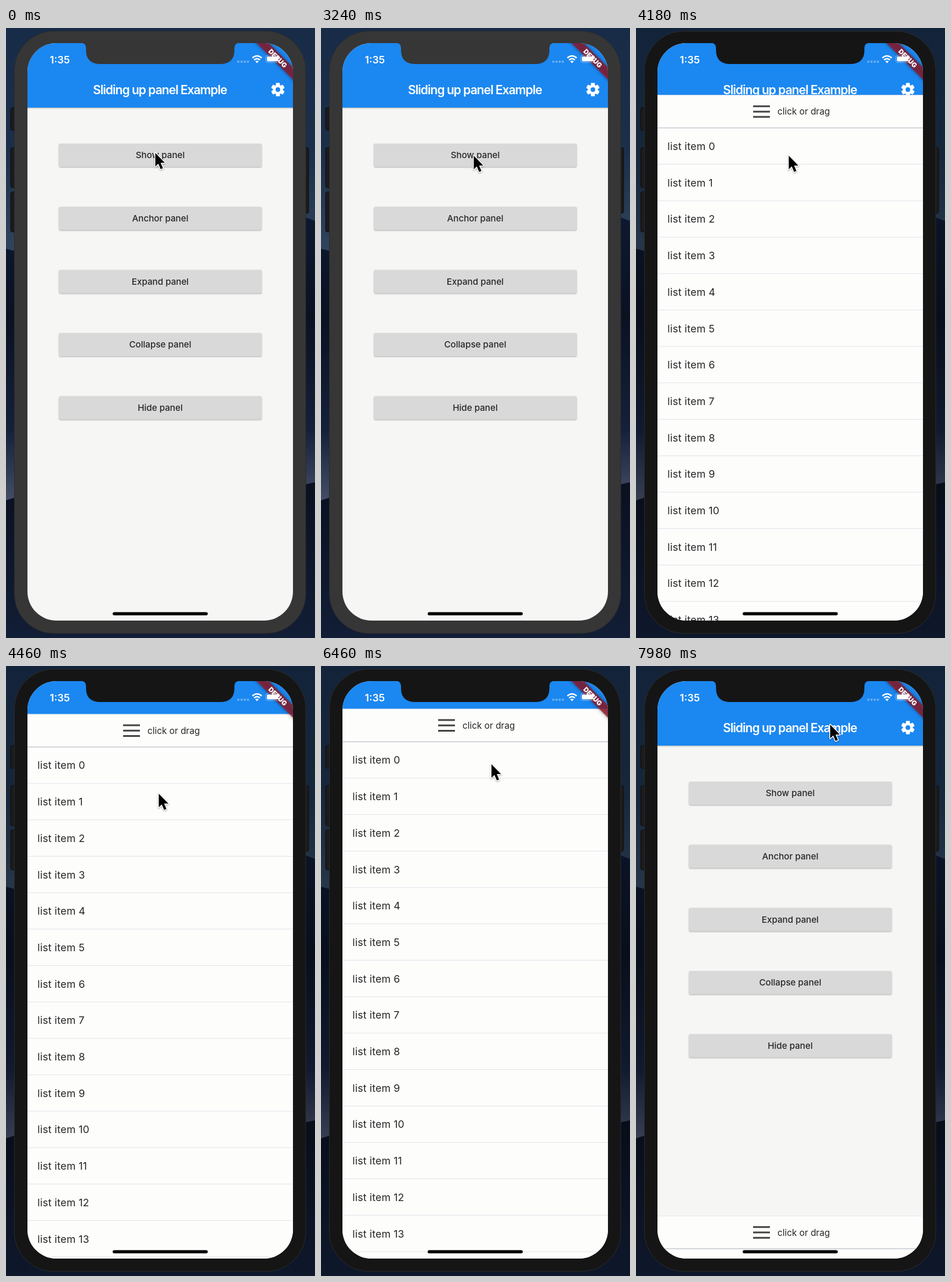
Animation of 533x1050 px, one loop 8000 ms. Source, as an HTML page:

```html
<!DOCTYPE html>
<html lang="en">
<head>
<meta charset="utf-8">
<title>Sliding up panel</title>
<style>
  html, body { margin: 0; width: 100%; height: 100%; overflow: hidden; background: #101b30; }
  svg { display: block; width: 533px; height: 1050px; }
  text { font-family: Inter, Roboto, sans-serif; dominant-baseline: central; fill: #262626; }
  .mid { text-anchor: middle; }
  .label { font-size: 15.2px; font-weight: 500; }
  .item { font-size: 17.7px; letter-spacing: .16px; }
  .white { fill: #fff; font-weight: 600; }
  .raised { filter: drop-shadow(0 1.5px 1.2px rgba(0, 0, 0, .3)); }
</style>
</head>
<body>
<svg viewBox="0 0 533 1050">
  <defs>
    <linearGradient id="sky" x2="0" y2="1">
      <stop offset="0" stop-color="#182c48"/>
      <stop offset=".2" stop-color="#1b2f4a"/>
      <stop offset=".36" stop-color="#30435c"/>
    </linearGradient>
    <linearGradient id="dune" x2="0" y2="1">
      <stop offset="0" stop-color="#0d1930"/>
      <stop offset=".35" stop-color="#0a1222"/>
      <stop offset=".75" stop-color="#15203a"/>
      <stop offset="1" stop-color="#454e67"/>
    </linearGradient>
    <linearGradient id="ground" x2="0" y2="1">
      <stop offset="0" stop-color="#0a1020"/>
      <stop offset="1" stop-color="#121e36"/>
    </linearGradient>
    <clipPath id="screen"><rect x="37" y="26" width="458" height="994" rx="50"/></clipPath>
    <clipPath id="showButton"><rect x="91" y="199" width="350" height="41" rx="2.5"/></clipPath>
  </defs>

  <rect width="533" height="1050" fill="url(#sky)"/>
  <path d="M0 380L16 384L514 325L533 332V815H0Z" fill="url(#dune)"/>
  <path d="M0 813L16 808L514 786L533 782V1050H0Z" fill="url(#ground)"/>
  <rect id="dim" width="533" height="1050" fill="#000" opacity="0"/>

  <g fill="#1b1b1d" stroke="#0c0c0e">
    <rect x="8" y="137" width="14" height="39" rx="3"/>
    <rect x="8" y="206" width="14" height="69" rx="3"/>
    <rect x="8" y="282" width="14" height="69" rx="3"/>
    <rect x="508" y="206" width="14" height="113" rx="3"/>
  </g>
  <rect id="bezel" x="14.5" y="5.5" width="502.5" height="1036.5" rx="68" stroke="#2b2b2b"/>

  <g clip-path="url(#screen)">
    <rect x="37" y="26" width="459" height="994" fill="#f6f6f5"/>
    <g id="buttons"></g>
    <circle id="ripple" cx="264" cy="220" clip-path="url(#showButton)"/>
    <rect class="raised" x="30" y="20" width="473" height="117" fill="#1b87f0"/>
    <text class="mid white" x="265.5" y="106" font-size="21" letter-spacing="-.95">Sliding up panel Example</text>
    <g id="gear" transform="translate(469 106)" fill="#fff"></g>
    <g id="panel"></g>
    <g transform="translate(495 26) rotate(45)">
      <rect x="-80" y="29.5" width="160" height="15" fill="#8c1a2c" fill-opacity=".82"
            style="filter:drop-shadow(0 0 3px rgba(0,0,0,.5))"/>
      <text class="mid white" y="37.3" font-size="11.5" style="font-weight:900">DEBUG</text>
    </g>
  </g>

  <path id="notch" d="M129 25.5Q138 26 138 34V38Q138 62 163 62H369Q394 62 394 38V34Q394 26 403 25.5Z"/>
  <text class="white" x="75.5" y="54" font-size="17.5">1:35</text>
  <g fill="#fff">
    <path d="M399 58H419" stroke="#fff" stroke-opacity=".35" stroke-width="3.5" stroke-dasharray="3.5 2"/>
    <g fill="none" stroke="#fff" stroke-width="2.6">
      <path d="M425 51.5Q433 44.5 441 51.5"/>
      <path d="M428 55Q433 50.5 438 55"/>
    </g>
    <path d="M430 57.5Q433 55 436 57.5L433 60.5Z"/>
    <rect x="448" y="47" width="24" height="12.5" rx="3.5" fill="none" stroke="#fff" stroke-opacity=".4"/>
    <rect x="450" y="49" width="20" height="8.5" rx="2"/>
    <rect x="473.5" y="51" width="1.8" height="4.5" rx="1" opacity=".5"/>
  </g>
  <rect x="184" y="1005.5" width="164" height="5.5" rx="2.75"/>

  <path id="cursor" d="M0 0V23.5L5.2 18.6L9.3 28L13.2 26.3L9.2 17H16.5Z" stroke="#fff" stroke-width="3"
        stroke-linejoin="round" paint-order="stroke" style="filter:drop-shadow(0 1px 1px rgba(0,0,0,.35))"/>
</svg>
<script>
const LOOP = 8000;
const HIDDEN = 1022, EXPANDED = 74, COLLAPSED = 963.5;
const SHOW_AT = 3415.5, COLLAPSE_AT = 7058.5;
const HEADER = 56.3, ROW = 62.7;

const $ = id => document.getElementById(id);
const clamp = (v, lo = 0, hi = 1) => Math.min(hi, Math.max(lo, v));
const mix = (a, b, k) => a + (b - a) * k;
const smooth = (t, from, to) => {
  const k = clamp((t - from) / (to - from));
  return k * k * (3 - 2 * k);
};
// Critically damped spring, 0 to 1
const spring = ms => {
  const x = Math.max(0, ms) * 0.0064;
  return 1 - (1 + x) * Math.exp(-x);
};
const line = (y, color) => `<path d="M37 ${y}H496" stroke="${color}"/>`;

$('buttons').innerHTML = ['Show', 'Anchor', 'Expand', 'Collapse', 'Hide'].map((name, i) => {
  const y = 199 + i * 108.7;
  return `<rect class="raised" x="91.5" y="${y}" width="349.5" height="40" rx="2.5" fill="#d9d9d9"/>
    <text class="mid label" x="266" y="${y + 19.7}">${name} panel</text>`;
}).join('');

$('gear').innerHTML = [0, 60, 120].map(a =>
  `<rect x="-3.4" y="-11.6" width="6.8" height="23.2" rx="1.2" transform="rotate(${a})"/>`
).join('') + '<circle r="8.6"/><circle r="4" fill="#1b87f0"/>';

const rows = Array.from({ length: 16 }, (_, i) => {
  const y = HEADER + i * ROW;
  return `<text class="item" x="54.3" y="${y + 31.6}">list item ${i}</text>` + line(y + ROW, '#e3e3ea');
}).join('');
$('panel').innerHTML = `<rect x="37" width="459" height="1100" fill="#fdfdfc"/>
  ${line(0, '#e6e6ee')}
  <path d="M202 19H231M202 28.2H231M202 37.4H231" stroke="#424242" stroke-width="3"/>
  <text x="244" y="28.3" font-size="15.4">click or drag</text>
  ${line(HEADER, '#a9b1ba')}${rows}`;

function draw(t) {
  const y = t < COLLAPSE_AT
    ? mix(HIDDEN, EXPANDED, spring(t - SHOW_AT))
    : mix(EXPANDED, COLLAPSED, spring(t - COLLAPSE_AT));
  $('panel').setAttribute('transform', `translate(0 ${y.toFixed(2)})`);

  const shown = t >= SHOW_AT;
  const frame = shown ? '#151515' : '#363636';
  $('bezel').setAttribute('fill', frame);
  $('notch').setAttribute('fill', frame);
  $('dim').setAttribute('opacity', shown ? 0.2 : 0);

  const pressed = t - SHOW_AT;
  $('ripple').setAttribute('r', clamp(pressed * 0.337, 0, 190));
  $('ripple').setAttribute('opacity', 0.075 * clamp(pressed / 75) * clamp((4100 - t) / 250));

  const near = smooth(t, 2600, 3100), away = smooth(t, 6100, 6900);
  const cx = mix(mix(257.5, 263.5, near), 335, away);
  const cy = mix(mix(215, 219.7, near), 101, away);
  $('cursor').setAttribute('transform', `translate(${cx} ${cy})`);
}

const start = performance.now();
function tick() {
  draw((performance.now() - start) % LOOP);
  requestAnimationFrame(tick);
}
tick();
</script>
</body>
</html>
```
